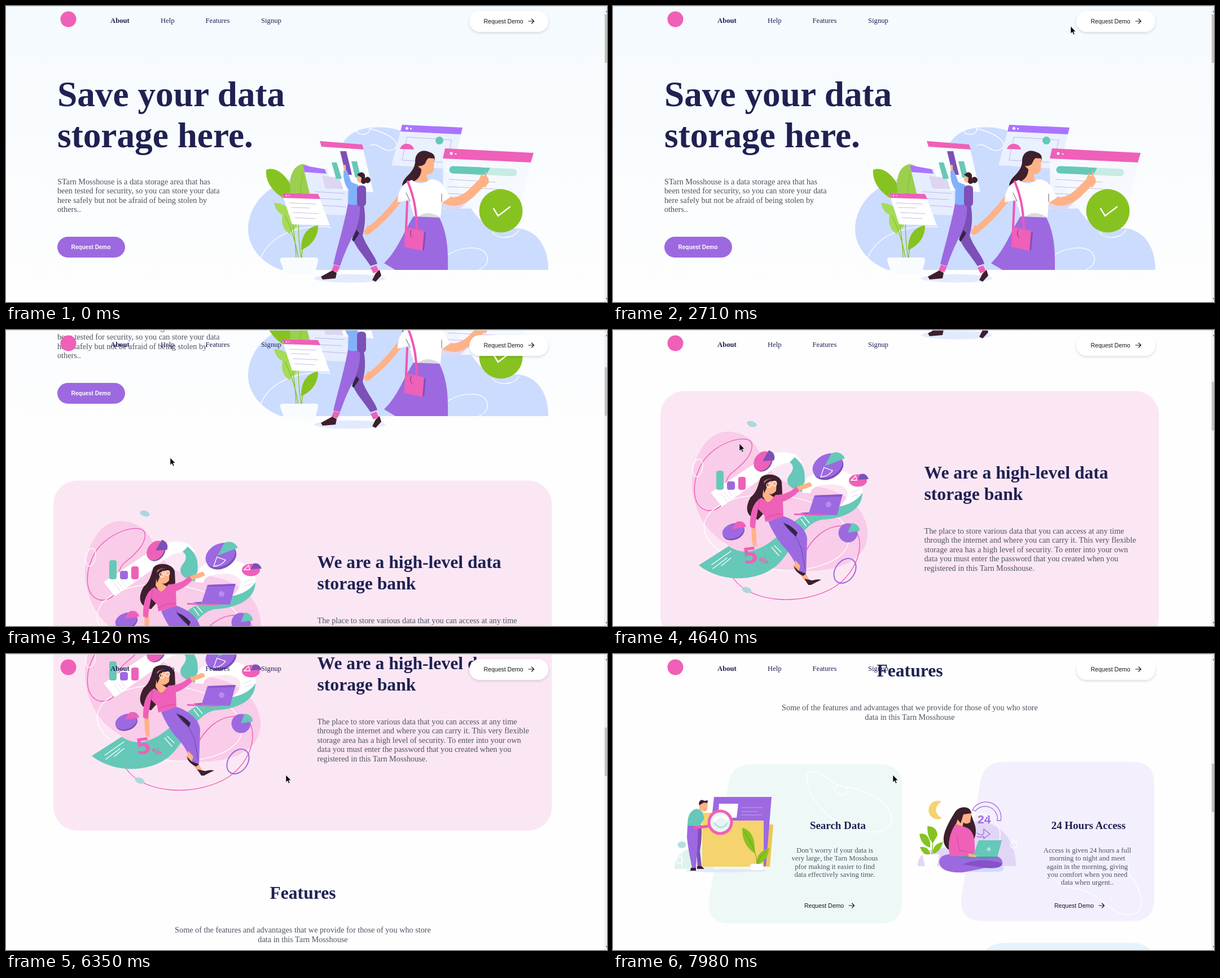
An HTML page that plays this animation: 1065 by 526 pixels, repeating every 8000 ms.

```html
<!DOCTYPE html>
<html lang="en">
<head>
<meta charset="utf-8">
<title>Storage landing page</title>
<style>
html, body { margin: 0; width: 100%; height: 100%; overflow: hidden; background: #fefefe }
svg { display: block; width: 1065px; height: 526px }
text { font-family: "Liberation Serif", serif; fill: #1f2152; white-space: pre }
.h1 { font-size: 63.3px; font-weight: bold }
.h2 { font-size: 31.64px; font-weight: bold }
.h3 { font-size: 18.98px; font-weight: bold }
.body { font-size: 14.24px; fill: #4e5461 }
.small { font-size: 12.66px; fill: #4e5461 }
.link { font-size: 12.66px }
.about { font-size: 12.66px; font-weight: bold }
.btn { font: 10.53px "Liberation Sans", sans-serif; fill: #17181c }
.light { font: bold 10px "Liberation Sans", sans-serif; fill: #fff }
.mid { text-anchor: middle }
.num { font-family: "DejaVu Sans", sans-serif; font-weight: bold }
.purple { fill: #9d69e0 } .violet { fill: #ab74ff } .deep { fill: #7d50b8 }
.pink { fill: #ef60b8 } .teal { fill: #66c8b8 } .green { fill: #86c321 } .lime { fill: #a6da59 }
.skin { fill: #ffb287 } .hair { fill: #3d1f2d } .white { fill: #fff } .yellow { fill: #f5d36e }
.line { fill: none; stroke: #fff; stroke-width: 1.3; stroke-linecap: round }
.line.p { stroke: #ee57b3 } .line.v { stroke: #9d69e0 } .line.thin { stroke: #b9a9e2; stroke-width: .8 }
.line.k { stroke: #17181c; stroke-width: 1.2 } .line.g { stroke: #86c321 }
.limb { fill: none; stroke: #ffb287; stroke-linecap: round; stroke-linejoin: round }
</style>
</head>
<body>
<svg viewBox="0 0 1065 526">
<defs>
  <linearGradient id="sky" x2="0" y2="1"><stop stop-color="#f5fafe"/><stop offset="1" stop-color="#fefefe"/></linearGradient>
  <filter id="soft" x="-10%" y="-20%" width="120%" height="160%"><feDropShadow dx="0" dy="2" stdDeviation="2" flood-color="#334" flood-opacity=".16"/></filter>
  <path id="card" d="M245 196H474Q512 196 512 234V441Q512 479 474 479H207Q167 478 170 438L204 232Q209 197 245 196Z"/>
  <path id="arrow" class="line k" d="M0 0H9M5.5-4 9.5 0 5.5 4"/>
</defs>

<g id="page">
<rect width="1060" height="526" fill="url(#sky)"/>
<g id="hero">
  <path fill="#ccdcfe" d="M487 469C450 455 428 425 429 395C431 345 475 305 545 300C600 288 575 228 640 217C705 208 735 240 760 270C810 320 830 400 880 399C930 382 962 420 961 469Z"/>
  <path class="line" d="M621 220C620 232 648 230 644 218C680 226 702 244 688 254C670 265 660 240 645 248M452 446C470 405 520 388 575 393M783 442C810 425 850 425 853 447C855 460 845 465 838 469M862 402C870 415 900 415 909 398"/>
  <ellipse cx="609" cy="484" rx="63" ry="7.5" fill="#e2ebfe"/>

  <path d="M702 211 809 216 791 290 683 283Z" fill="#e9f0fe"/>
  <path class="violet" d="M702 211 809 216 806 228 699 223Z"/>
  <path class="line thin" d="M711 233 790 238 781 278 702 274Z"/>
  <circle class="teal" cx="768" cy="239" r="7"/>
  <path class="pink" d="M698 254C702 241 720 242 723 255Z"/>
  <path class="white" d="M708 217.500a2.500 2.500 0 1 0 5 0a2.500 2.500 0 1 0-5 0M716 218a1.500 1.500 0 1 0 3 0a1.500 1.500 0 1 0-3 0"/>

  <path class="green" d="M461 291C482 282 512 312 511 350C490 345 458 322 461 291Z"/>
  <path fill="#9bcf4f" d="M507 345C498 312 505 285 525 281C552 282 560 325 520 372Z"/>
  <path class="lime" d="M475 350C495 349 510 365 516 392C499 404 502 408 508 407C488 400 488 382 490 371Q478 366 475 350Z"/>
  <path class="green" d="M553 390C553 410 543 424 523 434C522 410 533 392 553 390Z"/>
  <path class="line g" d="M478 304C500 340 512 390 514 447M526 300Q512 380 523 447M545 400Q524 420 524 447M494 372Q511 405 518 447"/>
  <path d="M490 447H549Q554 447 553 453L547 476H494L486 453Q485 447 490 447Z" fill="#f9fcff"/>

  <path d="M526 283 566 291 603 291 607 372 547 370Z" fill="#e5edfe"/>
  <path class="violet" d="M526 283 565 290 568 298 529 295Z"/>
  <path d="M556 240 631 246 651 331 578 326Z" fill="#fafdff"/>
  <path d="M560 302 591 305 598 326 566 324Z" fill="#dcd6f2"/>
  <path class="pink" d="M556 240 631 246 634 255 559 250Z"/>
  <path class="teal" d="M577 278H586L595 307H585ZM612 276H622L629 305H619Z"/>
  <path class="deep" d="M592 258H603L613 300H602Z"/>
  <path class="line thin" d="M548 330 600 333M553 342 595 344M556 354 602 357"/>
  <path class="white" d="M489 332 553 334 574 390 507 388Z"/>
  <path class="pink" d="M489 332 553 334 557 343 492 341Z"/>
  <path class="line thin" d="M502 350 549 352M505 358 538 359M509 367 553 369M512 376 548 378"/>
  <path class="white" d="M496 336h2v2h-2zM501 336h1.500v1.500h-1.500z"/>

  <path d="M774 271 930 278 911 360H775Z" fill="#f6f9fe" opacity=".9"/>
  <path class="pink" d="M778 253 935 261 930 278 774 271Z"/>
  <circle class="white" cx="789" cy="262" r="2.500"/><circle class="white" cx="797" cy="263" r="1.300"/>
  <g fill="none" stroke-width="13" stroke-linecap="round"><path d="M792 291 899 296" stroke="#c8ebe4"/><path d="M792 291 840 293" stroke="#66c8b8"/></g>
  <path class="teal" d="M835 286.500 858 287.500 851 300 833 299.500Z"/>
  <path class="line thin" d="M785 308 867 313M783 321 882 326M781 333 818 335"/>
  <path d="M771 346Q800 360 832 335L806 359Q790 365 771 357Z" fill="#ded8f0"/>

  <path class="deep" d="M620 353 634 354C639 380 634 399 632 408C639 428 655 445 658 458L646 462C632 440 614 424 613 405Z"/>
  <path class="purple" d="M606 351 627 353C629 378 620 400 610 418Q600 438 592 462L580 459C588 425 599 390 606 351Z"/>
  <path class="pink" d="M581 460 592 463 587 473 577 470ZM646 465 656 461 661 471 651 475Z"/>
  <path class="hair" d="M558 481 578 470 586 474 584 484 561 486ZM649 487 655 475 662 469 665 479 655 490Z"/>
  <path fill="#342443" d="M621 398 613 415 616 419 626 404Z"/>
  <path class="limb" d="M600 284 601 298" stroke-width="4"/>
  <path fill="#82b1fb" d="M598 293 604 292 612 313 624 318 626 351Q615 356 606 351L607 327Q597 314 598 293Z"/>
  <rect class="deep" x="622" y="319" width="16" height="37" rx="6"/>
  <circle class="skin" cx="628" cy="308" r="6"/>
  <path class="hair" d="M622 300Q631 291 636 300L636 306A5.500 5.500 0 1 1 638 314Q632 319 629 313L630 305Z"/>

  <path class="hair" d="M725 278C724 260 738 253 751 260C762 263 761 274 757 279L738 296C738 316 708 311 702 320C703 302 722 300 725 278Z"/>
  <path class="limb" d="M697 343Q670 379 640 401" stroke-width="11"/>
  <path class="skin" d="M641 389 635 403 643 405 653 397ZM727 282 746 270 759 271 758 290Q756 300 746 299L747 312 720 313Q736 306 736 290Z"/>
  <path class="hair" d="M726 279C733 262 746 258 760 268Q748 267 745 275L742 281Q735 286 727 284Z"/>
  <path class="limb" d="M777 343Q799 355 824 333L848 309" stroke-width="15"/>
  <path class="skin" d="M838 309 843 297 847 305 850 291 852 304 856 313 849 323Z"/>
  <path class="white" d="M719 309Q736 322 752 308Q770 307 779 326L787 340 772 350 770 376 723 374 714 344 694 349Q694 318 719 309Z"/>
  <path d="M729 376Q745 360 770 376Z" fill="#d9d9df"/>
  <path class="purple" d="M722 374 768 376C785 410 783 445 783 469H690L670 457C694 434 704 402 722 374Z"/>
  <path class="deep" d="M739 401 744 402 741 434 737 434Z"/>
  <path class="pink" d="M707 392 741 400 738 435 706 428Z"/>
  <path class="line p" style="stroke-width:4" d="M712 312C723 340 727 360 728 396M711 348 709 395"/>
  <path class="line k" style="stroke:#3d3452;stroke-width:.8" d="M709 332 716 347M772 334V348M718 398Q714 408 720 411"/>

  <circle class="green" cx="877" cy="364" r="38.500"/>
  <path class="line" style="stroke-width:2.500" d="M864 360 872 373 893 357"/>
  <rect class="purple" x="91" y="410" width="120" height="37" rx="18.500"/>
</g>

<g id="bank" transform="translate(0 554)">
  <rect x="84" y="29.500" width="883.500" height="442.500" rx="42" fill="#fbe7f4"/>
  <path fill="#f9cce9" d="M160 127C185 88 233 99 251 124C270 150 275 190 330 198C405 194 455 240 451 288C445 340 385 353 315 349C255 345 228 322 200 300C140 267 122 180 160 127Z"/>
  <path class="line p" d="M246 123C242 104 183 118 158 157C137 194 140 238 168 242C215 240 183 195 213 173C232 158 249 140 246 123ZM213 362C245 408 340 412 395 376C448 339 448 270 412 269C375 266 350 295 337 323"/>
  <ellipse class="line" cx="290" cy="281" rx="129" ry="66" transform="rotate(6 290 281)"/>
  <ellipse class="line" cx="150" cy="166" rx="8.500" ry="16" transform="rotate(12 150 166)"/>
  <g fill="#aed6dc"><ellipse cx="246" cy="88" rx="9" ry="5" transform="rotate(18 246 88)"/><ellipse cx="237" cy="383" rx="9" ry="5" transform="rotate(20 237 383)"/></g>

  <path class="white" d="M173 210 262 151Q293 130 325 143L336 157Q296 150 266 183L193 235Z"/>
  <path class="teal" d="M322 147C350 170 334 187 343 210C318 207 302 195 312 180Q325 164 313 156Z"/>
  <path class="white" d="M335 210C335 182 358 168 400 171C430 174 445 195 442 214Q426 240 400 235C425 215 419 197 390 195Q350 196 350 211Z"/>
  <path class="teal" d="M442 210C442 245 401 257 370 258C340 264 324 300 300 329C267 371 192 372 152 339L205 305C235 326 266 309 290 289C320 264 330 242 400 235Q430 229 442 210Z"/>
  <path class="line" d="M175 338 209 314M177 345 202 326M192 340 209 326M281 307 294 322M286 304 298 316M333 257 342 269M338 252 348 264"/>
  <path class="line thin" style="stroke:#d8cde5" d="M192 212 203 227M197 209 208 222M203 205 211 217M422 217 437 213M421 211 437 204"/>
  <g class="num pink"><text class="num" transform="translate(232 337) rotate(-8)" style="fill:inherit" font-size="39">5</text><text class="num" transform="translate(260 338) rotate(-8)" style="fill:inherit" font-size="16">%</text></g>
  <rect class="teal" x="183" y="171" width="13" height="34" rx="4"/><rect class="purple" x="202" y="190" width="14" height="15" rx="4"/><rect class="pink" x="222" y="182" width="13" height="23" rx="4"/>

  <g transform="translate(265 154) rotate(-55)"><ellipse class="deep" rx="19" ry="14.500" cy="2"/><ellipse class="pink" rx="19" ry="14"/><path class="deep" d="M0 0 22-2Q26 11 13 16Z"/></g>
  <g transform="translate(380 162) rotate(-28)"><ellipse class="deep" rx="28" ry="20" cy="4"/><ellipse class="purple" rx="28" ry="20"/><path class="line" d="M-7 0-20 12Q-8 18 4 12Z"/></g>
  <path class="teal" d="M375 163 387 140Q403 134 411 149Z"/>
  <ellipse class="pink" cx="434" cy="188.500" rx="16" ry="11"/><path class="deep" d="M434 187 438 177Q449 174 453 186Z"/><path class="line" d="M422 188 430 180 432 188Z"/>
  <g transform="translate(213 278) rotate(-20)"><ellipse class="deep" rx="20" ry="14" cy="2"/><ellipse class="purple" rx="20" ry="13"/></g><path class="pink" d="M210 275 219 262Q232 258 236 271Z"/>
  <circle class="purple" cx="416.500" cy="281.500" r="17"/><path class="teal" d="M416 281 423 264Q437 266 437 278Z"/>
  <ellipse class="line v" style="stroke-width:2" cx="411" cy="349" rx="17" ry="24" transform="rotate(35 411 349)"/>

  <path class="hair" d="M260 188C262 174 294 174 299 191L300 212C290 220 283 217 279 233L257 258C230 252 237 230 244 218C254 210 256 201 260 188Z"/>
  <path class="limb" d="M249 267 250 294M323 205 347 196" stroke-width="8"/>
  <path class="skin" d="M268 190Q278 181 290 190L289 207Q282 215 276 212L288 220 273 229 265 216ZM246 289 253 289 255 306 248 304ZM337 199 350 192 353 198 341 203Z"/>
  <path class="hair" d="M265 199Q272 179 292 189L277 190 268 211Z"/>
  <circle class="line" cx="276" cy="197" r="4"/><circle class="line" cx="286" cy="194" r="4"/>
  <path class="pink" d="M263 219 276 228 288 214Q310 214 325 199L330 207Q315 222 301 226L302 253 270 262 268 250 257 239 251 274 243 271Q242 230 263 219Z"/>
  <path class="line thin" style="stroke:#c94598" d="M257 239Q261 227 258 221M270 256Q285 247 300 248"/>
  <path class="purple" d="M275 261 303 252C323 259 343 275 344 292L342 355 332 356Q318 320 300 304Q283 282 275 261Z"/>
  <path fill="#302241" d="M302 264Q316 268 327 281L324 288Q312 278 302 264Z"/>
  <path class="line thin" style="stroke:#5b3e92" d="M302 262Q326 286 334 310L341 347"/>
  <path class="skin" d="M332 356 341 353 348 365 340 367ZM323 330 332 340 329 350 321 342Z"/>
  <path class="hair" d="M320 340 329 349 342 354 337 358Q323 352 320 340ZM339 363 353 366Q362 363 369 365Q360 369 351 374L346 374Z"/>
  <path class="purple" d="M357 215 407 213 397 250 346 249Z"/><path fill="#8a56cf" d="M357 215 407 213 405 217 359 218ZM331 246 347 245 346 250Z"/>
  <path class="pink" d="M321 247 377 249 376 251 321 250Z"/><circle cx="382" cy="231" r="5" fill="#b78cf0"/>
</g>

<g id="cards" transform="translate(0 1107)">
  <use href="#card" fill="#eef9f7"/>
  <use href="#card" x="447" y="-4.500" fill="#f4effc"/>
  <use href="#card" x="447" y="317.500" fill="#e5f4fc"/>
  <path class="line" d="M345 211C368 200 380 228 408 236C455 241 495 268 494 296C488 326 440 318 407 303C365 284 337 236 345 211ZM777 388C784 425 833 406 868 440C902 474 941 470 936 435Q929 402 907 385"/>
  <ellipse class="line" cx="404" cy="242" rx="13" ry="8" transform="rotate(15 404 242)"/>

  <path fill="#def3ef" d="M109 382C108 355 132 340 160 345L180 382Z"/>
  <ellipse cx="122" cy="339" rx="7.500" ry="6" fill="#b5dfe0"/><path class="line" d="M122 345V380M113 366a5 6 0 1 0 10 0a5 6 0 1 0-10 0"/>
  <ellipse cx="200" cy="385" rx="72" ry="3" fill="#dfe8fd"/>
  <path fill="#efc653" d="M273 303H284L278 378H262Z"/>
  <path class="purple" d="M179 254H281L271 377H166Z"/>
  <path class="white" d="M188 266H222L219 291H186Z"/>
  <path class="line thin" style="stroke:#ccb1f5" d="M228 273H265M228 280H257M227 286H264"/>
  <path class="yellow" d="M158 282H180L190 296H267V378H158Z"/>
  <path class="green" d="M229 309Q253 314 251 354Q228 339 229 309ZM277 345Q274 368 255 375Q252 352 277 345Z"/>
  <path class="line" style="stroke:#5f941a;stroke-width:.8" d="M233 316Q256 348 255 375M272 350Q257 361 256 375"/><rect class="white" x="243" y="373" width="23" height="11" rx="4"/>
  <path class="deep" d="M140 304H157Q158 330 154 350L157 378 150 380Q149 348 140 325Z"/>
  <path class="purple" d="M132 304H151Q150 342 147 380H140Q133 345 131 326Z"/>
  <path class="hair" d="M138 380H147V385H137ZM149 377H157L162 382H149ZM152 266Q154 256 162 261L168 260Q168 268 161 267L156 276Z"/>
  <path class="skin" d="M154 268 161 264 168 265 167 277Q162 283 158 278L151 281Z"/>
  <path class="teal" d="M149 275Q132 277 132 305L154 306 162 291 158 280Z"/>
  <path class="limb" d="M149 308 168 306" stroke-width="4"/>
  <path class="line p" style="stroke-width:5" d="M145 309 169 306"/>
  <circle cx="190" cy="299" r="20" fill="#e6f5f4" stroke="#ef60b8" stroke-width="5"/>
  <path class="line" style="stroke-width:5" d="M180 295Q190 283 202 293"/><path class="line" style="stroke:#b8dfdc;stroke-width:3" d="M180 301Q192 315 202 301"/>

  <path fill="#e2d6f6" d="M540 377C540 354 560 345 590 344C588 310 620 297 650 297C690 302 714 333 714 377Z"/>
  <path class="yellow" d="M582 262A16.500 16.500 0 1 0 583 292Q562 278 582 262Z"/>
  <path class="line v" d="M637 277A27 27 0 0 1 687 296H681A22 22 0 0 0 642 279ZM645 318Q655 325 657 318V311L668 320 657 328V324Q650 327 645 324"/>
  <text class="num" x="646" y="301" font-size="21" style="fill:#9d69e0;font-family:'Liberation Sans',sans-serif">24</text>
  <path class="line" d="M627 297Q645 274 665 290M684 340Q690 310 678 300M704 339a6 6 0 1 0 12 0a6 6 0 1 0-12 0"/>
  <path class="green" d="M557 306Q574 306 575 322L567 336Q557 328 557 306ZM543 320Q557 316 562 335L562 344Q546 340 543 320ZM585 334Q580 352 567 355Q566 337 585 334ZM544 343Q560 341 562 357Q549 358 544 343Z"/>
  <path class="line g" d="M562 315Q570 337 564 360"/><path class="white" d="M548 356H578L574 377H553Z"/>
  <path fill="#cfdbfd" d="M619 376H691Q696 387 680 387H619Z"/>
  <path class="hair" d="M606 281C616 267 637 271 635 286L640 300C650 325 634 350 603 352C573 340 588 310 606 281Z"/>
  <path class="skin" d="M615 283Q626 272 635 284L633 299Q625 304 621 299L618 313 606 307Z"/>
  <path class="hair" d="M606 287Q620 267 635 283L621 285 616 301Z"/>
  <path class="purple" d="M594 356H660Q690 357 690 371Q688 383 660 380L621 388Q580 390 578 370Q578 358 594 356Z"/>
  <path fill="#8651c9" d="M619 374Q650 360 690 372Q690 382 660 380Z"/>
  <path class="pink" d="M607 302 622 307Q641 311 641 340V359H597Q590 328 607 302Z"/>
  <path class="line thin" style="stroke:#c94598" d="M610 326 614 349 635 353"/>
  <path class="teal" d="M648 331H689L681 361H637Z"/><path fill="#36a696" d="M612 360H681V363H612Z"/>
  <circle cx="666" cy="347" r="3.500" fill="#a8e0d7"/><path class="skin" d="M630 354 646 358 643 361 630 360Z"/>
  <use href="#arrow" x="418" y="447"/><use href="#arrow" x="861" y="447"/>
</g>
</g>

<g id="nav">
  <circle class="pink" cx="110.500" cy="23.500" r="14"/>
  <rect class="white" x="821" y="9" width="140" height="37" rx="18.500" filter="url(#soft)"/>
  <use href="#arrow" x="926" y="27"/>
</g>
<rect width="1065" height="1" fill="#dadde0"/>
<rect x="1060" y="1" width="5" height="525" fill="#f1f1f1"/>
<path d="M1062.500 11 1065 8V11ZM1062.500 519H1065V522Z" fill="#666"/>
<rect id="thumb" x="1061" y="15" width="4" height="86" fill="#c1c1c1"/>

<g id="cursor">
  <path id="pointer" d="M0 0V13L3 10.300 5 15 7 14 5 9.500H9Z" stroke="#fff" stroke-width=".6"/>
  <path id="hand" d="M-1.500 1Q0-1 1.500 1V6L3 5.600 4 7 6 6.500 7 8 8.500 8V13L7 17H0L-4 11Q-4 8-1.500 10Z" fill="#fff" stroke="#000"/>
</g>
</svg>

<script>
const $ = id => document.getElementById(id);

function write(parent, x, y, style, copy, pitch = 16.6) {
  copy.split('|').forEach((line, i) => {
    const text = document.createElementNS('http://www.w3.org/2000/svg', 'text');
    text.setAttribute('x', x);
    text.setAttribute('y', y + i * pitch);
    text.setAttribute('class', style);
    text.textContent = line;
    $(parent).append(text);
  });
}

write('nav', 185, 29.5, 'about', 'About');
write('nav', 274, 29.5, 'link', 'Help');
write('nav', 353.5, 29.5, 'link', 'Features');
write('nav', 452, 29.5, 'link', 'Signup');
write('nav', 846.5, 31, 'btn', 'Request Demo');
write('hero', 91, 178, 'h1', 'Save your data|storage here.', 73);
write('hero', 91, 316.5, 'body', 'STarn Mosshouse is a data storage area that has|been tested for security, so you can store your data|here safely but not be afraid of being stolen by|others..');
write('hero', 115.5, 432, 'light', 'Request Demo');
write('bank', 551.5, 185, 'h2', 'We are a high-level data|storage bank', 37.7);
write('bank', 551.5, 282.5, 'body', 'The place to store various data that you can access at any time|through the internet and where you can carry it. This very flexible|storage area has a high level of security. To enter into your own|data you must enter the password that you created when you|registered in this Tarn Mosshouse.');
write('cards', 526, 40, 'h2 mid', 'Features');
write('cards', 526, 100, 'body mid', 'Some of the features and advantages that we provide for those of you who store|data in this Tarn Mosshouse');
write('cards', 398.5, 311, 'h3 mid', 'Search Data');
write('cards', 393, 353, 'small mid', 'Don’t worry if your data is|very large, the Tarn Mosshous|pfor making it easier to find|data effectively saving time.', 14.3);
write('cards', 842.5, 311, 'h3 mid', '24 Hours Access');
write('cards', 840.5, 353, 'small mid', 'Access is given 24 hours a full|morning to night and meet|again in the morning, giving|you comfort when you need|data when urgent..', 14.3);
write('cards', 339, 451, 'btn', 'Request Demo');
write('cards', 782, 451, 'btn', 'Request Demo');

// [time, wheel notches scrolled]
const notches = [[0, 0], [960, 1], [1050, 3], [1140, 2], [1300, 0], [3720, 1], [3820, 2], [3920, 3], [4040, 4],
  [4560, 5], [4640, 6], [4870, 7], [6120, 8], [6200, 9], [6270, 10], [6350, 9], [6890, 10], [6970, 11],
  [7290, 12], [7350, 13], [7980, 14]];

// [first step, last step, step count, points passed through]
const moves = [
  [110, 880, 11, [[878, 508], [600, 330], [308, 181], [319, 187]]],
  [1450, 1520, 2, [[319, 187], [338, 194]]],
  [1770, 2560, 11, [[338, 194], [368, 130], [228, 70], [225, 30], [287, 20]]],
  [2630, 2710, 2, [[287, 20], [811, 36]]],
  [2860, 3170, 5, [[814, 36], [845, 37]]],
  [3320, 3720, 6, [[845, 37], [429, 173]]],
  [3800, 4120, 5, [[429, 173], [291, 227]]],
  [4180, 4340, 3, [[291, 227], [224, 202]]],
  [5250, 5950, 10, [[224, 202], [420, 115], [748, 160], [640, 222], [496, 215]]]
];
const handTimes = [[1140, 1450], [2400, 2630], [2860, 3320]];

const latest = (list, t) => list.filter(item => item[0] <= t).pop() || list[0];

function cursorAt(t) {
  const [start, end, steps, points] = latest(moves, t);
  const progress = Math.max(0, Math.min(1, (t - start) / (end - start)));
  const step = 1 + Math.floor(progress * (steps - 1) + 1e-6);
  const along = step / steps * (points.length - 1);
  const i = Math.min(Math.floor(along), points.length - 2);
  return points[i].map((v, axis) => v + (points[i + 1][axis] - v) * (along - i));
}

function draw() {
  const t = performance.now() % 8000;
  const scroll = Math.round(latest(notches, t)[1] * 79.1);
  const isHand = handTimes.some(([from, to]) => t >= from && t < to);
  $('page').setAttribute('transform', `translate(0 ${-scroll})`);
  $('thumb').setAttribute('y', 15 + scroll * .1625);
  $('cursor').setAttribute('transform', `translate(${cursorAt(t)})`);
  $('cursor').style.display = t < 110 ? 'none' : '';
  $('hand').style.display = isHand ? '' : 'none';
  $('pointer').style.display = isHand ? 'none' : '';
  requestAnimationFrame(draw);
}
draw();
</script>
</body>
</html>
```
